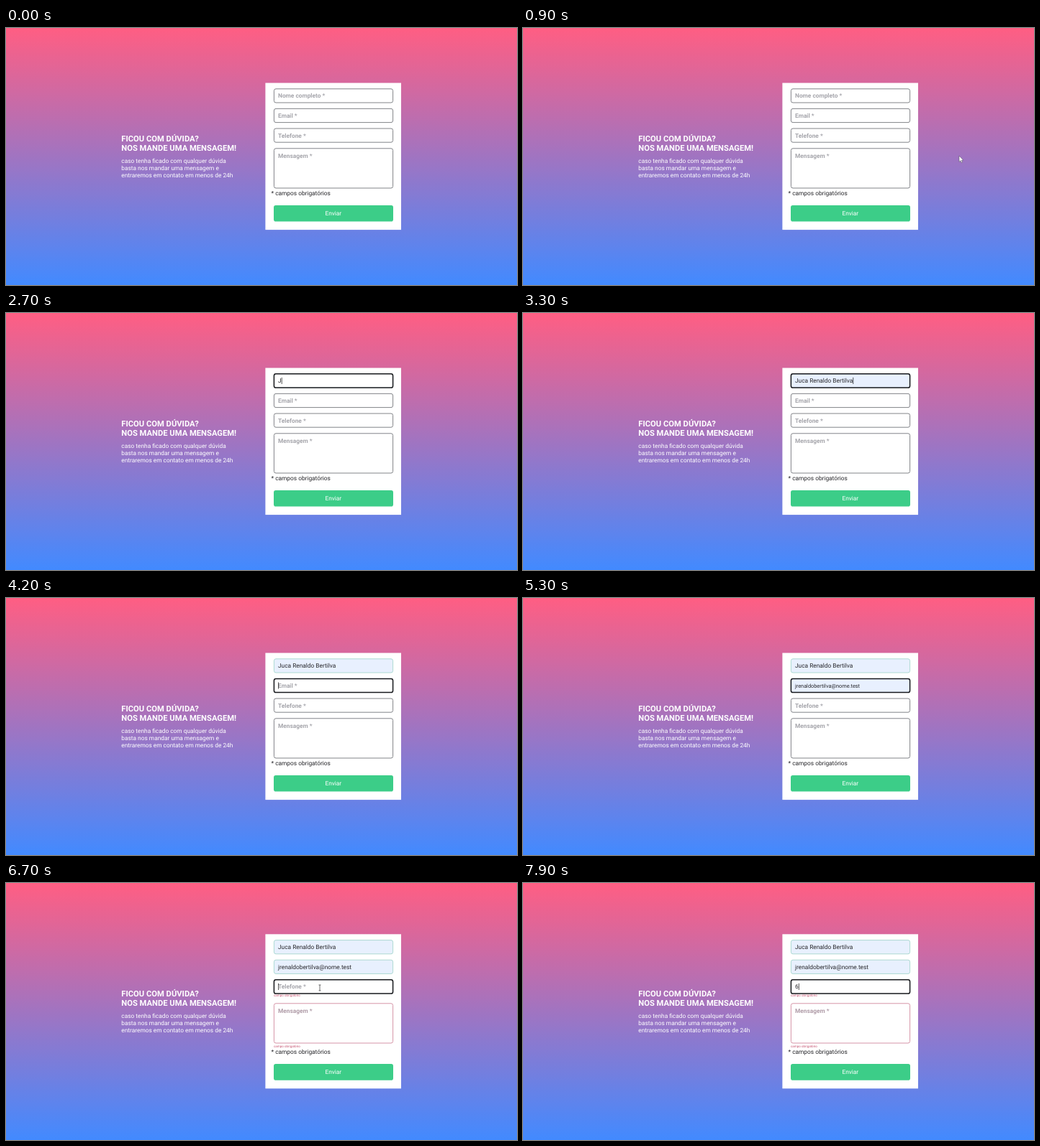
Recreate the animation shown at these times as an HTML page. Size 710 by 358 pixels, loop 8 s.

```html
<!DOCTYPE html>
<html lang="pt">
<head>
<meta charset="utf-8">
<title>Contato</title>
<style>
  html, body { margin: 0; width: 100%; height: 100%; overflow: hidden; }
  body { background: linear-gradient(#ff5e83, #428aff); }
  svg { display: block; width: 710px; height: 358px; }
  text { font: 8.33px Roboto, sans-serif; fill: #26262a; text-rendering: geometricPrecision; white-space: pre; }
  .light { fill: #fff; }
  .title { font-size: 11.21px; font-weight: 700; }
  .hint { font-weight: 700; fill: #a6a6ac; }
  .preview { font-size: 7.35px; }
  .error { font-size: 4.5px; fill: #c4506e; }
  .box { fill: #fff; stroke: #74767c; stroke-width: 0.9; }
  .box.filled { fill: #e8f0fe; }
  .box.valid { stroke: #a5d6cd; }
  .box.invalid { stroke: #d28a9d; }
  .box.focus { stroke: #16181c; stroke-width: 1.5; }
  .caret { fill: #111; }
</style>
</head>
<body>
<svg viewBox="0 0 710 358">
  <text class="light title" x="160.3" y="157.6">FICOU COM DÚVIDA?</text>
  <text class="light title" x="160.3" y="171.4">NOS MANDE UMA MENSAGEM!</text>
  <text class="light" x="160.3" y="188.2">caso tenha ficado com qualquer dúvida</text>
  <text class="light" x="160.3" y="198.2">basta nos mandar uma mensagem e</text>
  <text class="light" x="160.3" y="208.2">entraremos em contato em menos de 24h</text>
  <g id="form"></g>
  <path id="arrow" d="M0 0V8.4L1.9 6.7L3.2 9.6L4.6 9L3.3 6.2H5.8Z" fill="#fff" stroke="#4a4a55" stroke-width="0.5"/>
  <path id="beam" d="M-1.5 -4H1.5M0 -4V4M-1.5 4H1.5" fill="none" stroke="#333" stroke-width="0.7"/>
</svg>
<script>
const LOOP = 8000;
const NAME = 'Juca Renaldo Bertilva';
const MAIL = 'jrenaldobertilva@nome.test';
const HINTS = ['Nome completo *', 'Email *', 'Telefone *'];
const GROW = 5.2;
const start = { name: '', mail: '', phone: '', focus: -1, caret: false, preview: -1, filled: 0, errors: false };

// Each step changes only the listed parts of the form.
const steps = [
  [2000, { focus: 0, caret: true }],
  [2500, { caret: false }],
  [2700, { name: 'J', caret: true }],
  [3100, { name: NAME, preview: 0, filled: 1, caret: false }],
  [3300, { preview: -1, caret: true }],
  [3900, { caret: false }],
  [4200, { focus: 1, caret: true }],
  [4700, { caret: false }],
  [4800, { mail: 'j', caret: true }],
  [5300, { mail: MAIL, preview: 1, filled: 2, caret: false }],
  [5600, { preview: -1, caret: true }],
  [6200, { caret: false }],
  [6300, { focus: -1 }],
  [6400, { errors: true }],
  [6700, { focus: 2, caret: true }],
  [7200, { caret: false }],
  [7800, { caret: true }],
  [7900, { phone: '6' }]
];

// time, x, y, shape
const pointer = [
  [0, 0, 0, ''],
  [900, 606, 178, 'arrow'], [1000, 614, 164, 'arrow'],
  [1100, 619, 153, 'arrow'], [1200, 621, 146, 'arrow'],
  [1400, 573, 136, 'arrow'], [1500, 520, 112, 'beam'],
  [1600, 470, 95, 'beam'], [2700, 0, 0, ''],
  [5900, 468, 150, 'beam'], [6000, 462, 185, 'beam'],
  [6100, 452, 222, 'beam'], [6200, 440, 250, 'arrow'],
  [6300, 434, 260, 'arrow'], [6700, 436, 146, 'beam'],
  [7900, 0, 0, '']
];

const form = document.getElementById('form');
const cursors = ['arrow', 'beam'].map(id => document.getElementById(id));

const rect = (x, y, w, h, attrs) => `<rect x="${x}" y="${y}" width="${w}" height="${h}" ${attrs}/>`;
const label = (x, y, str, cls = '', attrs = '') => `<text x="${x}" y="${y}" class="${cls}" ${attrs}>${str}</text>`;
const box = (y, h, cls) => rect(372.4, y, 165.2, h, `rx="2.6" class="box ${cls}"`);

function field(s, i, value, lift) {
  const mid = 94.4 + 27.6 * i - lift;
  const focused = s.focus === i;
  const filled = i < s.filled;
  const cls = [
    filled && 'filled',
    filled && !focused && 'valid',
    s.errors && !filled && 'invalid',
    focused && 'focus'
  ].filter(Boolean).join(' ');
  const textCls = value ? (s.preview === i ? 'preview' : 'value') : 'hint';
  let out = box(mid - 9.6, 19.2, cls) + label(378, mid + 2.9, value || HINTS[i], textCls);
  if (focused && s.caret) out += rect(378, mid - 4.6, 0.7, 9.2, 'class="caret"');
  return out;
}

function draw(s) {
  const lift = s.errors ? GROW : 0;
  let out = rect(360.4, 76.5 - lift, 188.6, 204.6 + 2 * lift, 'fill="#fff"');
  [s.name, s.mail, s.phone].forEach((value, i) => out += field(s, i, value, lift));
  out += box(167.8, 55.2, s.errors ? 'invalid' : '');
  out += label(378, 180.9, 'Mensagem *', 'hint', s.errors ? 'style="fill:#b09ca8"' : '');
  if (s.errors) out += [158.3, 229].map(y => label(372, y, 'campo obrigatório', 'error')).join('');
  out += label(368.5, 232.9 + lift, '* campos obrigatórios');
  out += rect(372, 246.9 + lift, 166, 22.6, 'rx="2.8" fill="#3ccd88"');
  out += label(454.8, 261 + lift, 'Enviar', 'light', 'text-anchor="middle"');
  form.innerHTML = out;

  // Place the caret after whatever has been typed.
  const caret = form.querySelector('.caret');
  const typed = caret && caret.previousElementSibling;
  if (typed && typed.classList.contains('value')) {
    caret.setAttribute('x', 378 + typed.getComputedTextLength() + 0.2);
  }
}

function movePointer(t) {
  const [, x, y, shape] = pointer.filter(p => p[0] <= t).pop();
  for (const el of cursors) {
    el.style.display = el.id === shape ? '' : 'none';
    el.setAttribute('transform', `translate(${x} ${y})`);
  }
}

let shown = -1;
function tick() {
  const t = performance.now() % LOOP;
  const past = steps.filter(step => step[0] <= t);
  if (past.length !== shown) {
    shown = past.length;
    draw(Object.assign({}, start, ...past.map(step => step[1])));
  }
  movePointer(t);
  requestAnimationFrame(tick);
}
tick();
</script>
</body>
</html>
```
